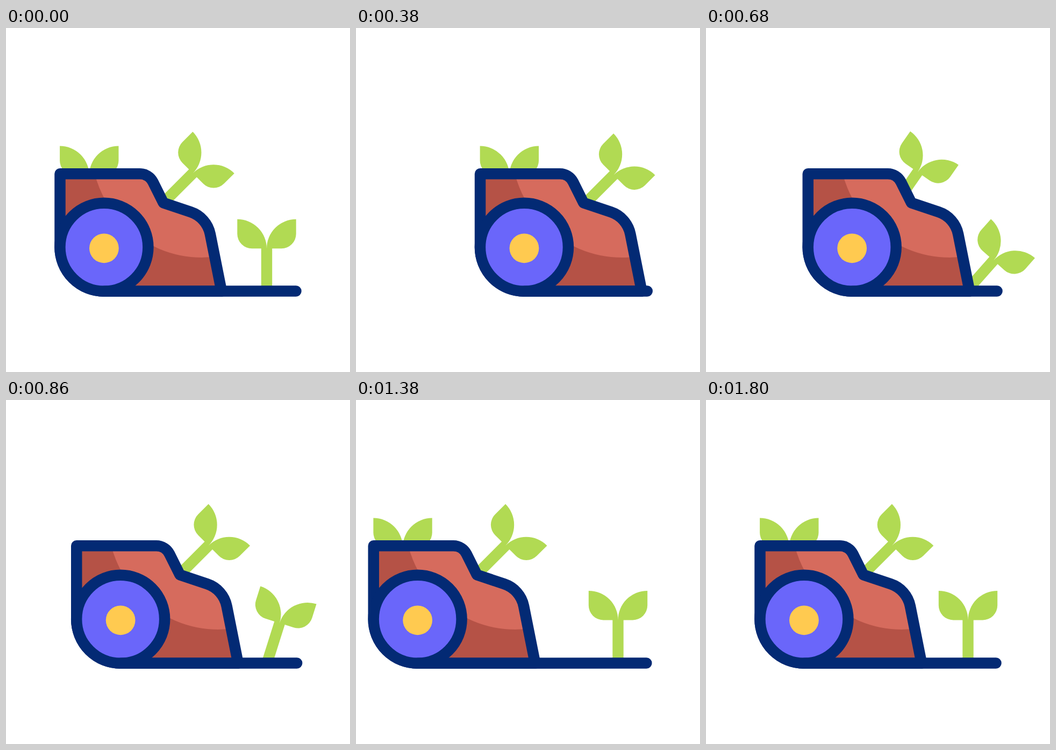
Recreate the animation shown at these times as an HTML page. Size 640x640 px, loop 2.4 s.

```html
<!DOCTYPE html>
<html lang="en">
<head>
<meta charset="utf-8">
<title>Planting machine</title>
<style>
  html, body { margin: 0; width: 100%; height: 100%; overflow: hidden; background: #fff; }
  svg { display: block; width: 100%; height: 100%; }
</style>
</head>
<body>
<svg viewBox="0 0 640 640">
  <defs>
    <path id="body" d="M100.5 408V271.3H249A27.3 27.3 0 0 1 273.4 286.4L292.8 325.3L343.6 342.3A54.6 54.6 0 0 1 379.9 383.4L401.1 489.7H182.4A82 82 0 0 1 100.5 408Z"/>
    <!-- The origin is the foot of the stem. -->
    <path id="sprout" d="M-10.2 10V-70.5H-27.3A27.3 27.3 0 0 1 -54.7 -97.8V-125A54.7 54.5 0 0 1 0 -70.5A54.7 54.5 0 0 1 54.7 -125V-97.8A27.3 27.3 0 0 1 27.3 -70.5H10.2V10Z"/>
    <clipPath id="bodyClip"><use href="#body"/></clipPath>
    <clipPath id="aboveGround"><rect width="640" height="490"/></clipPath>
  </defs>
  <g clip-path="url(#aboveGround)" fill="#b1da53">
    <use id="planted" href="#sprout"/>
    <use id="front" href="#sprout"/>
    <use id="rear" href="#sprout"/>
    <use id="next" href="#sprout"/>
  </g>
  <g stroke="#032a74" stroke-width="20.5" stroke-linecap="round" stroke-linejoin="round">
    <g id="car">
      <use href="#body" fill="#b55246" stroke="none"/>
      <g clip-path="url(#bodyClip)" stroke="none">
        <ellipse cx="364" cy="217" rx="206" ry="210" fill="#d66b5d"/>
      </g>
      <use href="#body" fill="none"/>
      <circle cx="182.4" cy="407.8" r="82" fill="#6a66fa"/>
      <circle cx="182.4" cy="409.8" r="27.4" fill="#ffca50" stroke="none"/>
    </g>
    <line id="ground" y1="489.7" y2="489.5"/>
  </g>
</svg>
<script>
const LOOP = 2400, FORWARD = 413, BACK = 1318, STOP = 1800;
const el = id => document.getElementById(id);
const [planted, front, rear, next, car, ground] =
  ['planted', 'front', 'rear', 'next', 'car', 'ground'].map(el);

const mix = (a, b, p) => a + (b - a) * p;
const clamp = v => Math.min(1, Math.max(0, v));
const ease = (t, start, end) => {
  const s = clamp((t - start) / (end - start));
  return s * s * (3 - 2 * s);
};

// Cubic Bézier easing, solved by bisection.
function bezier(x1, y1, x2, y2, x) {
  const at = (a, b, s) => 3 * a * s * (1 - s) ** 2 + 3 * b * s * s * (1 - s) + s ** 3;
  let lo = 0, hi = 1;
  for (let i = 0; i < 24; i++) {
    const mid = (lo + hi) / 2;
    if (at(x1, x2, mid) < x) lo = mid; else hi = mid;
  }
  return at(y1, y2, hi);
}

// Offset of the car and of the far end of the ground line.
function drive(t) {
  if (t < FORWARD) {
    const p = ease(t, 0, FORWARD);
    return [132.8 * p, 2.3 * p];
  }
  if (t < BACK) {
    const p = ease(t, FORWARD, 1337);
    return [mix(132.8, -81, p), mix(2.3, 1, p)];
  }
  const p = bezier(.167, .22, .833, 1, clamp((t - BACK) / (STOP - BACK)));
  return [mix(-81, 0, p), mix(1, 0, p)];
}

const place = (node, x, y, angle = 0) =>
  node.setAttribute('transform', `translate(${x} ${y}) rotate(${angle})`);

function draw(t) {
  const [dx, tip] = drive(t);
  car.setAttribute('transform', `translate(${dx} 0)`);
  ground.setAttribute('x1', 182.4 + dx);
  ground.setAttribute('x2', 539.5 + tip);

  place(planted, 485, 480.8 + 125 * ease(t, 0, 375));

  const drop = ease(t, 362, 589), upright = ease(t, 605, 1051);
  place(front,
    mix(mix(297.7 + dx, 488.2, drop), 487.5, upright),
    mix(mix(320.1, 485.8, drop), 479.9, upright),
    45 * (1 - upright));

  const lean = ease(t, 400, 806);
  place(rear, mix(154.8, 296.2, lean) + dx, mix(344.5, 320.6, lean), 45 * lean);

  place(next, 154.8 + dx, 344.5 + 125 * (1 - ease(t, 748, 1123)));
}

const begin = performance.now();
function tick() {
  draw((performance.now() - begin) % LOOP);
  requestAnimationFrame(tick);
}
draw(0);
requestAnimationFrame(tick);
</script>
</body>
</html>
```
